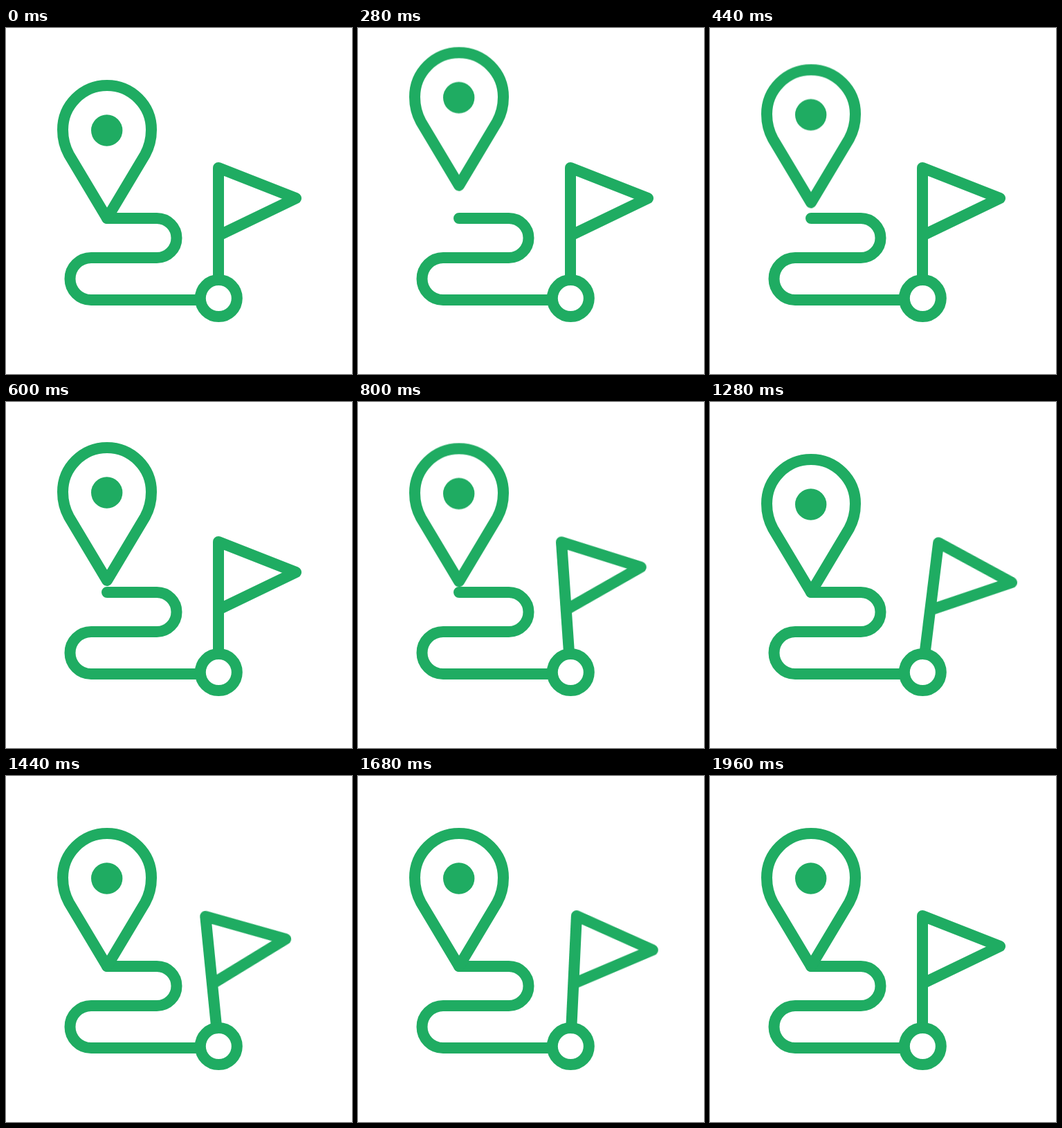
Recreate the animation shown at these times as an HTML page. Size 500 px wide and 500 px high, loop 2 s.

```html
<!DOCTYPE html>
<html lang="en">
<head>
<meta charset="utf-8">
<title>Route</title>
<style>
  html, body { margin: 0; width: 100%; height: 100%; overflow: hidden; background: #fff; }
  svg { display: block; width: 100%; height: 100%; }
  .line { fill: none; stroke: #1fac62; stroke-width: 16; stroke-linecap: round; stroke-linejoin: round; }
  .dot { fill: #1fac62; }
  #flag { transform-origin: 307px 391px; }
</style>
</head>
<body>
<svg viewBox="0 0 500 500">
  <path class="line" d="M146 275H218a28.5 28.5 0 0 1 0 57H123a30.5 30.5 0 0 0 0 61H280"/>
  <g id="flag">
    <path class="line" d="M307 364V202L419 246L307 300"/>
  </g>
  <circle class="line" cx="307.3" cy="390.6" r="26.5"/>
  <g id="pin">
    <path class="line" d="M146 275L91 183C85 172 82 160 82 147A64 64 0 0 1 210 147C210 160 207 172 201 183Z"/>
    <circle class="dot" cx="145.7" cy="148" r="22.7"/>
  </g>
</svg>
<script>
  const LOOP = 2000;
  const SWAY = 'cubic-bezier(.364,0,.636,1)';
  const RISE = 'cubic-bezier(.333,.667,.667,1)';
  const FALL = 'cubic-bezier(.333,0,.667,.333)';

  // Each step: time in ms, value, easing towards the next step.
  function play(id, steps, toTransform) {
    const frames = steps.map(([time, value, easing = 'linear']) => ({
      offset: time / LOOP,
      transform: toTransform(value),
      easing
    }));
    const motion = document.getElementById(id)
      .animate(frames, { duration: LOOP, iterations: Infinity });
    motion.startTime = document.timeline.currentTime;
  }

  // The pin hops twice, the second time half as high.
  play('pin', [
    [0, 0, SWAY],
    [240, -48.5, FALL],
    [515, 0, RISE],
    [696, -23.5, FALL],
    [877, 0],
    [LOOP, 0]
  ], y => `translateY(${y}px)`);

  // The flag swings about the ring and settles.
  play('flag', [
    [0, 0],
    [677, 0, SWAY],
    [927, -8, SWAY],
    [1186, 11.8, SWAY],
    [1460, -5.9, SWAY],
    [1710, 3, SWAY],
    [1960, 0],
    [LOOP, 0]
  ], a => `rotate(${a}deg)`);
</script>
</body>
</html>
```
